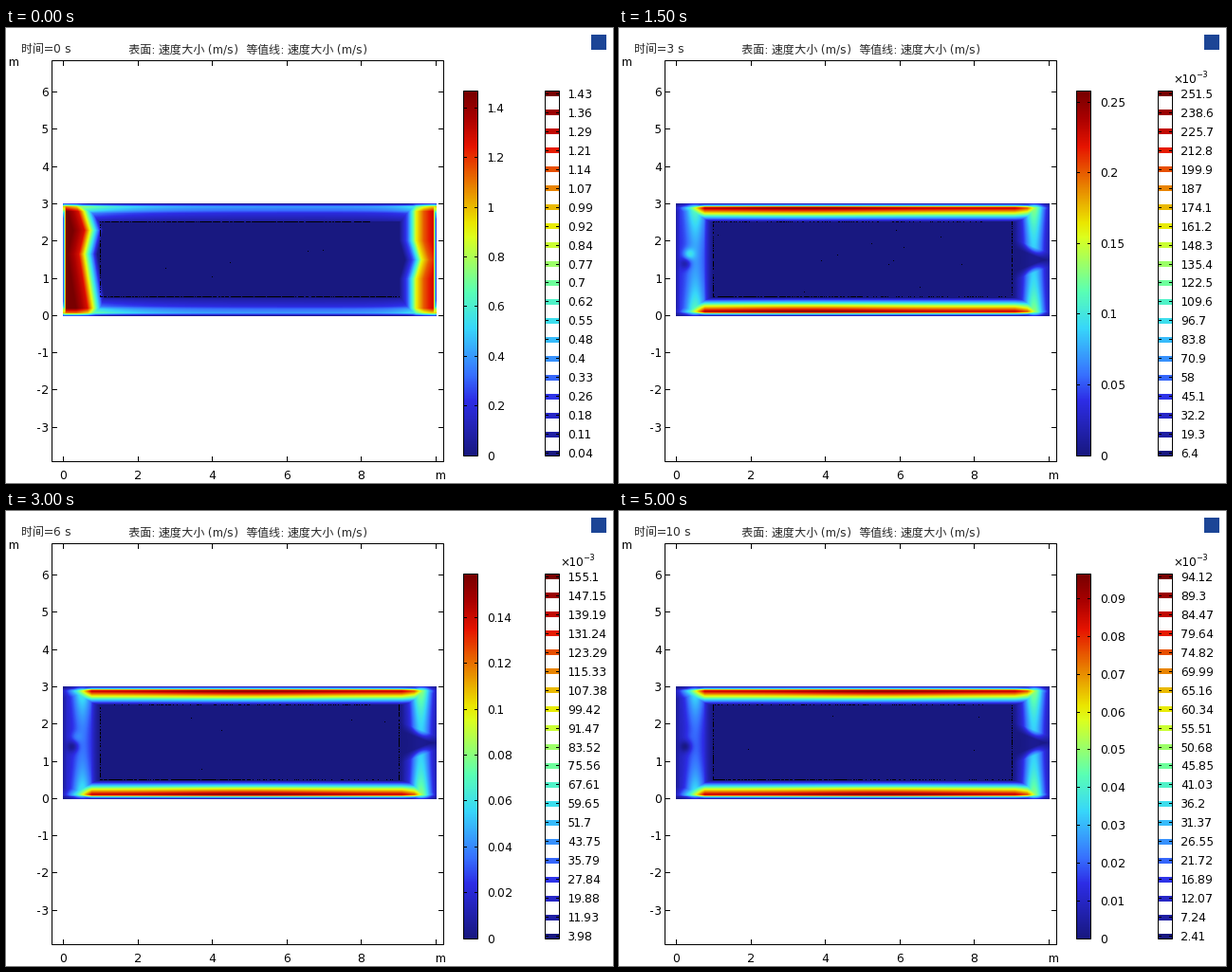
A matplotlib script for the animation above (5.5 s loop, 640 by 480 pixels).

```python
import numpy as np
import matplotlib.pyplot as plt
from matplotlib.animation import FuncAnimation
from matplotlib.colors import LinearSegmentedColormap
from matplotlib.patches import Rectangle

plt.rcParams.update({
    "font.family": ["DejaVu Sans", "Noto Sans CJK JP"],
    "text.hinting_factor": 1,  # whole-pixel glyph advances
    "toolbar": "None",
})

W, H, DPI = 640, 480, 80
PX = 72 / DPI
UNIT = 39.3          # pixels per metre
MID = 244            # centre line of the channel

# Peak speed at each second, m/s
PEAK = [1.469, 0.3994, 0.316585, 0.2579, 0.214945, 0.18408,
        0.159078, 0.1385, 0.121572, 0.10799, 0.0965365]

cmap = LinearSegmentedColormap.from_list("rainbow", [
    (0, "#181880"), (.15, "#2d2de6"), (.22, "#3770ff"), (.35, "#37d7fa"),
    (.45, "#5affb4"), (.6, "#dcff1e"), (.64, "#ebe600"), (.85, "#e61400"),
    (.93, "#a80000"), (1, "#780000")], N=512)

X, Y = np.meshgrid(np.arange(60, 454), np.arange(185, 304))
WALL = np.minimum(Y - 185, 303 - Y)
U = (Y - MID) / 59


def bump(x, y, r):
    return np.exp(-((X - x) ** 2 + (Y - y) ** 2) / r ** 2)


def duct(knots, speeds):
    return np.where(WALL < 19, np.interp(WALL, knots, speeds), 0)


def start_field():
    """Fast plugs at both ends with wavy fronts, slow ducts between."""
    x = (X - 60) / UNIT
    level = .27 + .4 * np.exp(-x / 1.2) + .4 * np.exp((x - 10) / .5)
    ducts = level * duct([0, 1.5, 3, 7, 10, 19], [.12, .6, 1, .8, .5, .15])

    front = np.interp(Y, [188, 213, 238, 300], [80, 88, 82, 92])
    inlet = np.interp(X - front, [-18, -6, 0, 6, 14], [1, .87, .62, .35, 0])
    front = 432 + 6 * np.clip(1 - abs(Y - MID) / 20, 0, 1)
    outlet = np.interp(X - front, [-18, -9, -4, 0, 8, 16],
                       [0, .2, .42, .62, .78, .87])
    side = np.minimum(X - 60, 453 - X)
    skin = np.minimum(np.interp(WALL, [0, 3, 8], [.2, .75, 1]),
                      np.interp(side, [0, 1, 3], [.2, .4, 1]))
    return np.maximum(ducts, skin * np.maximum(inlet, outlet))


def flow_field(t):
    """Fast ducts; the end columns fade as the flow dies down."""
    early = np.exp(-(t - 1) / 3)
    centre = 60 + UNIT * (1.3 + 4.4 * (1 - early))
    level = .9 + .08 * np.exp(-((X - centre) / 100) ** 2)
    level *= np.interp(X, [60, 74, 90, 417, 430, 453], [.1, .45, 1, 1, .87, .1])
    ducts = level * duct([0, 2, 3.5, 5, 11, 14, 19],
                         [.1, .4, .95, .97, .6, .36, .03])

    inlet = .08 + .12 * early
    inlet = inlet + (.12 + .02 * early + .22 * U ** 2) * np.exp(-((X - 80) / 10) ** 2)
    inlet += .3 * early * bump(73, 238, 6) - .12 * bump(70, 248, 6)
    inlet *= np.clip((99 - X) / 10, 0, 1) * np.clip((X - 57) / 7, 0, 1)

    outlet = .04 + (.29 + .22 * U ** 2) * np.exp(-((X - 437) / 11) ** 2)
    wake = 12 * (446 - X) / 31
    outlet *= np.clip((abs(Y - MID) - wake) / 10, .08, 1)
    outlet *= np.clip((X - 414) / 6, 0, 1)
    ends = np.maximum(inlet, outlet) * np.interp(WALL, [0, 4], [.3, 1])
    return np.maximum(ducts, ends)


def surface(t):
    rgb = cmap(np.clip(flow_field(t) if t else start_field(), 0, 1))[..., :3]
    rng = np.random.default_rng(t + 7)

    def speckle(x0, x1, y0, y1, share):
        part = rgb[y0 - 185:y1 - 185, x0 - 60:x1 - 60]
        part[rng.random(part.shape[:2]) < share] = 0

    # Broken black contours around the inner block
    speckle(99, 100, 204, 284, .6)
    speckle(99, 384, 204, 205, .3 if t else .85)
    speckle(99, 258, 283, 284, .8)
    speckle(258, 415, 283, 284, .3 if t else .8)
    if t:
        speckle(414, 415, 204, 284, .65)
    speckle(104, 410, 210, 280, .0003)
    return rgb


fig = plt.figure(figsize=(W / DPI, H / DPI), dpi=DPI, facecolor="white")
ax = fig.add_axes([0, 0, 1, 1])
ax.set_xlim(0, W)
ax.set_ylim(H, 0)
ax.axis("off")


def line(x0, y0, x1, y1):
    return ax.plot([x0, x1], [y0, y1], color="black", lw=PX, zorder=5,
                   solid_capstyle="butt", snap=False)[0]


def box(x0, y0, x1, y1):
    ax.add_patch(Rectangle((x0, y0), x1 - x0, y1 - y0, fill=False, ec="black",
                           lw=PX, zorder=5, joinstyle="miter", snap=False))


def label(x, y, s, ha="left", size=12, color="black"):
    return ax.text(x, y, s, ha=ha, va="baseline", color=color,
                   fontsize=size * PX)


def picture(rgb, x0, x1, y0, y1):
    return ax.imshow(rgb, extent=(x0, x1, y1, y0), aspect="auto",
                     interpolation="nearest", zorder=2)


def edge_ticks(y, x0, x1, n):
    y = np.floor(y) + .5
    return [line(x0, y, x0 + n, y), line(x1 - n, y, x1, y)]


def plain(v, digits):
    s = f"{v:.{digits}f}"
    return s.rstrip("0").rstrip(".") if "." in s else s


# Plot frame and axes
box(48.5, 34.5, 461.5, 457.5)
for k in range(0, 11, 2):
    x = np.floor(60.5 + UNIT * k) + .5
    line(x, 457, x, 452)
    line(x, 35, x, 40)
    if k < 10:
        label(x, 476, str(k), "center")
for k in range(-3, 7):
    y = int(303.3 - UNIT * k)
    edge_ticks(y, 49, 461, 5)
    label(45, y + 5, str(k), "right")
label(458, 476, "m", "center")
label(7.5, 40, "m", "center")
label(129, 26, "表面: 速度大小 (m/s)  等值线: 速度大小 (m/s)", color="#282828")
ax.add_patch(Rectangle((617, 7), 16, 16, color="#1c4596", lw=0))

# Continuous colour bar and contour legend
picture(cmap(np.linspace(1, 0, 384))[:, None, :3], 483, 497, 67, 451)
box(482.5, 66.5, 497.5, 451.5)
box(568.5, 66.5, 583.5, 451.5)
level_y = np.linspace(448.5, 69.5, 20)
for i, y in enumerate(level_y):
    ax.add_patch(Rectangle((569, round(y - 3)), 14, 6, lw=0,
                           color=cmap(i / 19), zorder=2))
    edge_ticks(y, 569, 583, 3)

image = picture(surface(0), 60, 454, 185, 304)
clock = label(16, 26, "", color="#282828")
power = [label(584, 58, "×10"), label(608, 52, "−3", size=8.5)]
levels = [label(592, int(y) + 5, "") for y in level_y]
scale = []


def update(t):
    peak = PEAK[t]
    clock.set_text(f"时间={t} s")
    image.set_data(surface(t))

    while scale:
        scale.pop().remove()
    step = next(s for s in (.01, .02, .05, .1, .2, .5) if peak / s < 11)
    for k in range(int(peak / step) + 1):
        y = 451 - 384.5 * k * step / peak
        scale.extend(edge_ticks(y, 483, 497, 3))
        scale.append(label(507, int(y) + 5, plain(k * step, 2)))

    small = peak < .35
    unit, digits = (1000, 1 if peak > .2 else 2) if small else (1, 2)
    for part in power:
        part.set_visible(small)
    for i, text in enumerate(levels):
        text.set_text(plain(peak * unit * (i + .5) / 20, digits))
    return []


anim = FuncAnimation(fig, update, frames=len(PEAK), interval=500,
                     repeat=True, repeat_delay=0, blit=False)
plt.show()
```
